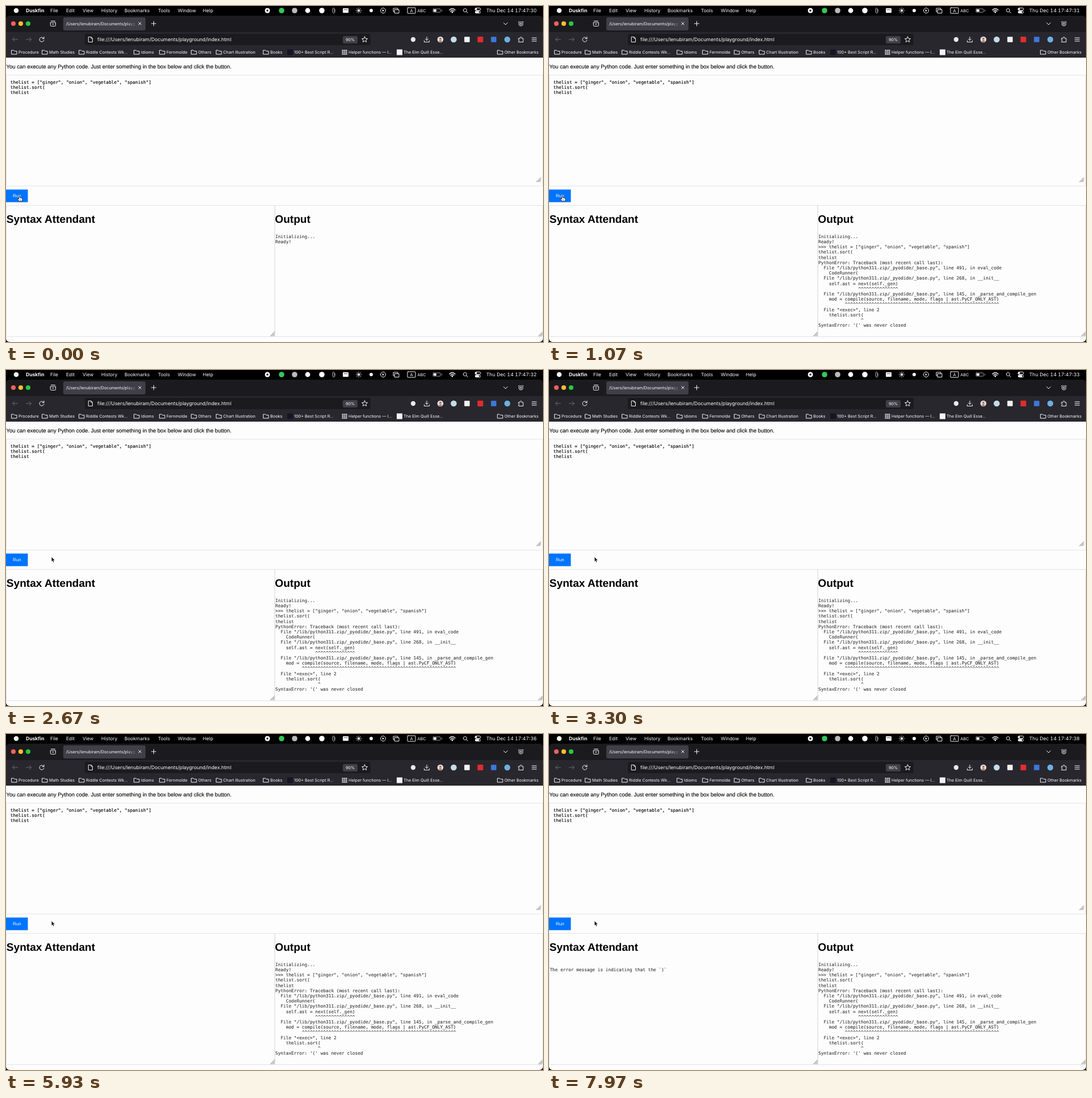
Animation, 947 px wide and 592 px high, one loop 8 s. Source, as an HTML page:

```html
<!DOCTYPE html>
<html lang="en">
<head>
<meta charset="utf-8">
<title>Python playground</title>
<style>
  html, body { margin: 0; width: 100%; height: 100%; overflow: hidden; background: #000; }
  svg { display: block; width: 947px; height: 592px; }
  text { font-family: Inter, sans-serif; white-space: pre; text-rendering: geometricPrecision; }
  .page { font-family: "Liberation Sans", Arial, sans-serif; }
  .mono { font-family: "DejaVu Sans Mono", monospace; font-size: 7.79px; stroke-width: .14; }
  .line { fill: none; stroke: #f4f4f7; stroke-width: 1; stroke-linecap: round; stroke-linejoin: round; }
</style>
</head>
<body>
<svg id="stage" viewBox="0 0 947 592">
  <defs>
    <linearGradient id="fade">
      <stop offset="0" stop-color="#403f48" stop-opacity="0"/>
      <stop offset="1" stop-color="#403f48"/>
    </linearGradient>
  </defs>
  <rect width="947" height="592"/>
  <g id="window">
    <path d="M0 91V24Q0 17 7 17H940Q947 17 947 24V91Z" fill="#1b1b1f"/>
    <rect y="46" width="947" height="45" fill="#28272e"/>
    <path d="M0 91H947V585Q947 592 940 592H7Q0 592 0 585Z" fill="#fdfdfd"/>
    <rect x="101" y="20" width="145" height="23" rx="3" fill="#403f48"/>
    <rect x="139" y="49" width="504" height="20" rx="3" fill="#1b1b1f"/>
    <rect x="594" y="53" width="26" height="13" rx="2.5" fill="#403f48"/>
  </g>
  <g id="icons"></g>
  <g id="labels"></g>
  <g id="page">
    <g fill="none" stroke="#dcdcdc" stroke-width=".8">
      <rect x=".4" y="121.8" width="946.2" height="195.4"/>
      <rect x=".4" y="351.3" width="473.6" height="231.4"/>
      <rect x="474" y="351.3" width="472.6" height="231.4"/>
    </g>
    <rect y="323.4" width="38.5" height="22.2" fill="#0073ff"/>
  </g>
  <g id="traceback"></g>
  <g id="hand">
    <path d="M-1 1.2Q-1 0 0 0T1 1.2V3.8Q2.1 3 2.8 4Q3.8 3.6 4.2 4.6Q5.6 4.3 5.6 6L5 9.8H-.8Q-1.4 8.2-3.2 6.2Q-3.3 4.8-2 5.3L-1 6.1Z" fill="#fff" stroke="#000" stroke-width=".75" stroke-linejoin="round"/>
    <path d="M1 6.5V8.5M2.5 6.5V8.5" stroke="#000" stroke-width=".5"/>
  </g>
  <path id="arrow" d="M0 0V8.4L1.9 6.7L3.2 9.8L4.7 9.2L3.4 6.2H6Z" stroke="#fff" stroke-width=".6"/>
</svg>
<script>
const LOOP = 8000, RUN_AT = 270, TICK = 780;
const MOVE_START = 1300, MOVE_END = 1750;
const ANSWER_AT = 7100, TOKEN_MS = 90;
const LINE_HEIGHT = 9.21;
const CODE = 'thelist = ["ginger", "onion", "vegetable", "spanish"]\nthelist.sort(\nthelist';
const TOKENS = ['The', ' error', ' message', ' is', ' indicating', ' that', ' the', ' `', ')', '`'];
const ERROR = `>>> ${CODE}
PythonError: Traceback (most recent call last):
  File "/lib/python311.zip/_pyodide/_base.py", line 491, in eval_code
    CodeRunner(
  File "/lib/python311.zip/_pyodide/_base.py", line 268, in __init__
    self.ast = next(self._gen)
               ${'^'.repeat(15)}
  File "/lib/python311.zip/_pyodide/_base.py", line 145, in _parse_and_compile_gen
    mod = compile(source, filename, mode, flags | ast.PyCF_ONLY_AST)
          ${'^'.repeat(58)}
  File "<exec>", line 2
    thelist.sort(
                ^
SyntaxError: '(' was never closed`;

const $ = id => document.getElementById(id);

function add(parent, tag, attrs) {
  const node = document.createElementNS('http://www.w3.org/2000/svg', tag);
  for (const key in attrs) node.setAttribute(key, attrs[key]);
  return $(parent).appendChild(node);
}
function label(x, y, size, string, attrs) {
  const node = add('labels', 'text', { x, y, 'font-size': size, fill: '#fbfbfe', ...attrs });
  node.textContent = string;
  return node;
}
function mono(parent, x, y, string, color, lineHeight = LINE_HEIGHT) {
  return string.split('\n').map((row, i) => {
    const node = add(parent, 'text', { x, y: y + i * lineHeight, class: 'mono', fill: color, stroke: color });
    node.textContent = row;
    return node;
  });
}
const line = (x, y, d, attrs) => add('icons', 'path', { d, class: 'line', transform: `translate(${x} ${y})`, ...attrs });
const dot = (x, y, r, fill) => add('icons', 'circle', { cx: x, cy: y, r, fill });
const box = (x, y, w, h, fill, rx = 1) => add('icons', 'rect', { x: x - w / 2, y: y - h / 2, width: w, height: h, rx, fill });
const ring = r => `M${-r} 0A${r} ${r} 0 1 1 ${r} 0A${r} ${r} 0 1 1 ${-r} 0Z`;

// Menu bar
label(35, 11, 8.6, 'Duskfin', { 'font-weight': 700 });
[[78, 'File'], [106, 'Edit'], [135, 'View'], [168, 'History'], [209, 'Bookmarks'],
 [268, 'Tools'], [303, 'Window'], [347, 'Help']].forEach(([x, s]) => label(x, 11, 8.4, s));
label(725.5, 10.7, 7.3, 'ABC');
const clock = label(847, 11, 8.7, '', { style: 'font-variant-numeric: tabular-nums' });

dot(18, 8, 4.3, '#f4f4f4');
dot(461, 8, 4.5, '#fff'); box(461, 8, 3, 3, '#000', .6);
dot(486, 8, 4.8, '#35c759');
dot(509, 8, 4.8, '#bbb');
dot(532, 8, 4.4, '#fff');
dot(557, 8, 4.8, '#fff');
line(578, 8, 'M2-2V2Q2 4.5 0 4.5T-2 2V-2.5Q-2-4.5-.5-4.5T1-2.5V1.5', { style: 'stroke:#bbb' });
box(599, 8, 10, 8, '#fff'); box(599, 6.5, 7, 1, '#555', 0);
dot(622, 8, 2.2, '#fff');
for (let i = 0; i < 8; i++) line(622, 8, 'M0-3.6V-4.6', { transform: `translate(622 8) rotate(${i * 45})` });
dot(644, 8, 3, '#f4f4f4');
line(665, 8, ring(4.5)); line(665, 8, 'M-1.2-2L2 0L-1.2 2Z', { style: 'fill:#fff;stroke:none' });
line(688, 8, 'M-3 2H-5V-4H3V-2M-2.5-1.5H5V4.5H-2.5Z');
line(715, 8, 'M-6-5H6Q7-5 7-4V4Q7 5 6 5H-6Q-7 5-7 4V-4Q-7-5-6-5Z');
label(715, 10.7, 7.5, 'A', { 'text-anchor': 'middle' });
line(760, 8, 'M-6-3H5Q6-3 6-2V2Q6 3 5 3H-6Q-7 3-7 2V-2Q-7-3-6-3Z', { style: 'stroke:#999' });
box(756.5, 8, 5, 4, '#fff'); box(768.5, 8, 1.2, 3, '#999', .5);
line(787, 8, 'M-5-1Q0-5.5 5-1M-3 1.2Q0-1.8 3 1.2', { style: 'stroke-width:1.5' }); dot(787, 11, 1.4, '#fff');
line(809.5, 7.5, ring(3) + 'M2.2 2.2L4.8 4.8');
line(832, 5.5, 'M-3-2H3Q5-2 5 0T3 2H-3Q-5 2-5 0T-3-2Z'); dot(829, 5.5, 1.4, '#fff');
box(832, 10.7, 10, 4.5, '#fff', 2.2); dot(835, 10.7, 1.3, '#000');

// Tab strip
[[13, '#ff5f57'], [26, '#febc2e'], [39, '#28c840']].forEach(([x, c]) => dot(x, 31, 4.1, c));
line(83, 31, 'M-4.5-2H4.5V3.5Q4.5 4.5 3.5 4.5H-3.5Q-4.5 4.5-4.5 3.5ZM-3.5-4.5H3.5M-1.5 1H1.5');
label(106, 34, 7.25, '/Users/lenubiram/Documents/playg');
add('labels', 'rect', { x: 212, y: 24, width: 18, height: 15, fill: 'url(#fade)' });
line(236, 31, 'M-2.2-2.2L2.2 2.2M2.2-2.2L-2.2 2.2');
line(260.5, 31, 'M-4 0H4M0-4V4');
line(881, 31, 'M-3.5-1.5L0 2L3.5-1.5');
line(908, 31.5, ring(3.6) + 'M-1.5 0H1.5M0-1.5V1.5M-4.5-3L-3-4.5M4.5-3L3-4.5');

// Navigation bar
line(16, 59, 'M4.5 0H-4.5M-1-3.5L-4.5 0L-1 3.5', { style: 'stroke:#6c6b73' });
line(40, 59, 'M-4.5 0H4.5M1-3.5L4.5 0L1 3.5', { style: 'stroke:#6c6b73' });
line(63, 59, 'M3.5-2A4 4 0 1 0 4 1M4-4.5V-1.5H1');
line(149, 59, 'M-3.3-4.5H1L3.5-2V4.5H-3.3ZM1-4.5V-2H3.5');
label(161, 62, 8.68, 'file:///Users/lenubiram/Documents/playground/index.html');
label(607, 61.7, 7.2, '90%', { 'text-anchor': 'middle' });
line(632.5, 59, 'M0-5L1.5-1.7L5-1.4L2.3 1L3.1 4.5L0 2.6L-3.1 4.5L-2.3 1L-5-1.4L-1.5-1.7Z');
dot(718, 59, 4.2, '#e8e8ec');
line(742, 59, 'M0-4.5V1.5M-2.5-1L0 1.5L2.5-1M-4.5 2V4.5H4.5V2');
dot(766, 59, 5.3, '#e6dedb'); dot(766, 57.8, 2, '#a66d5e'); box(766, 62, 5, 3, '#a66d5e', 1.5);
dot(789.5, 59, 5.3, '#c4dce9');
box(813, 59, 9.5, 9.5, '#f2f2f2');
box(836.5, 59, 10, 10, '#e02d2d');
box(860, 59, 9.5, 9.5, '#3e78da');
dot(884, 59, 5.2, '#6eafe0');
line(908, 59, 'M-4-2H-1.5V-3.5Q0-5.5 1.5-3.5V-2H4V4.5H-4V2.5Q-1 1-4 0Z');
line(931.5, 59, 'M-4-3H4M-4 0H4M-4 3H4');

// Bookmarks bar
const bookmark = (x, s) => label(x, 84, 7.3, s);
[[22, 'Procedure'], [76, 'Math Studies'], [141, 'Riddle Contests Wk...'], [238, 'Idioms'],
 [283, 'Fernmolde'], [339, 'Others'], [383, 'Chart Illustration'], [466, 'Books'],
 [879, 'Other Bookmarks']].forEach(([x, s]) => {
  bookmark(x, s);
  line(x - 7.5, 81.5, 'M-4.5-3.5H-1L.5-2H4.5V3.5H-4.5Z');
});
box(501, 81.5, 10, 10, '#171426');
bookmark(508, '100+ Best Script R...');
box(597, 81.5, 9, 9, '#b9b9bd', 0);
line(597, 81.5, 'M-1.5-4V4M1.5-4V4M-4-1.5H4M-4 1.5H4', { style: 'stroke:#3c3b45;stroke-width:.7' });
bookmark(604, 'Helper functions — I...');
box(694, 81.5, 10, 10, '#f4f4f4', 0);
bookmark(701, 'The Elm Quill Esse...');

// Page
const pageText = (x, y, size, s, attrs) => label(x, y, size, s, { class: 'page', fill: '#000', ...attrs });
pageText(.4, 109.7, 9.56, 'You can execute any Python code. Just enter something in the box below and click the button.',
  { stroke: '#000', 'stroke-width': .1 });
pageText(.8, 382.4, 19.1, 'Syntax Attendant', { 'font-weight': 700 });
pageText(474.3, 382.4, 19.1, 'Output', { 'font-weight': 700 });
$('page').appendChild(pageText(19.4, 337.4, 8, 'Run', { fill: '#fff', 'text-anchor': 'middle' }));
[[943, 310], [474, 581.5], [946.5, 581.5]].forEach(([x, y]) =>
  line(x, y, 'M-7.5 0L0-7.5M-5 0L0-5M-2.5 0L0-2.5', { style: 'stroke:#555;stroke-width:.8' }));
mono('page', 7.8, 136.7, CODE, '#000', 9.3);
mono('page', 475, 408.7, 'Initializing...\nReady!', '#3c3c3c');
mono('traceback', 475, 408.7 + 2 * LINE_HEIGHT, ERROR, '#3c3c3c');
const [answer] = mono('page', 1.4, 417.7, '', '#3c3c3c');

function render(t) {
  clock.textContent = 'Thu Dec 14 17:47:' + (30 + Math.max(0, Math.floor((t - TICK) / 1000) + 1));
  $('traceback').style.visibility = t < RUN_AT ? 'hidden' : 'visible';
  answer.textContent = TOKENS.slice(0, Math.max(0, Math.floor((t - ANSWER_AT) / TOKEN_MS) + 1)).join('');

  const p = Math.min(1, Math.max(0, (t - MOVE_START) / (MOVE_END - MOVE_START)));
  const eased = p * p * (3 - 2 * p);
  const x = 23.6 + 56.6 * eased, y = 334.3 - 5 * eased;
  const overButton = x < 38.5;
  for (const id of ['hand', 'arrow']) {
    $(id).setAttribute('transform', `translate(${x} ${y})`);
    $(id).style.visibility = (id === 'hand') === overButton ? 'visible' : 'hidden';
  }
}
function frame() {
  render(performance.now() % LOOP);
  requestAnimationFrame(frame);
}
frame();
</script>
</body>
</html>
```
